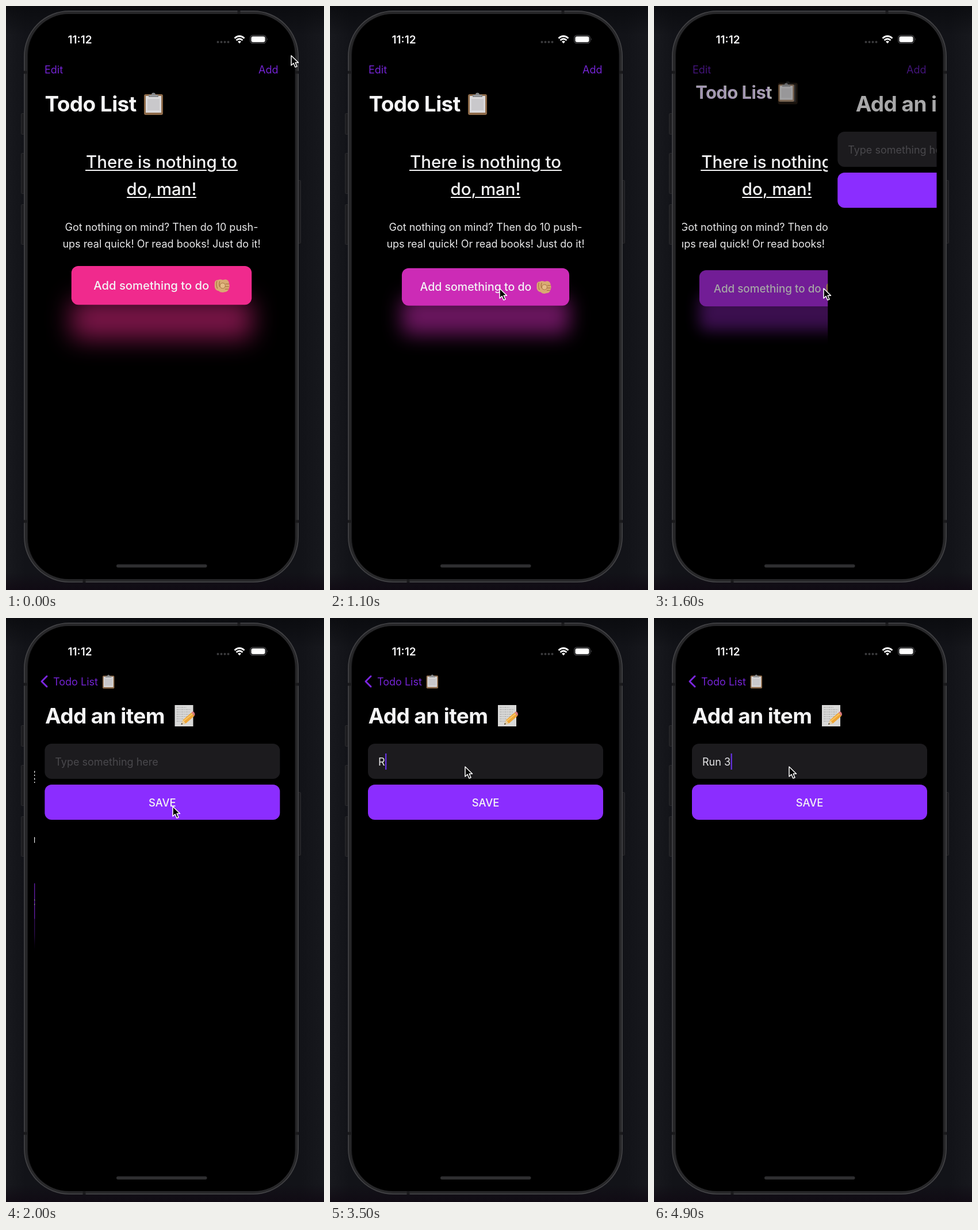
Write an HTML page that moves like this. It is 553 px wide and 1013 px high and loops after 5 s.

```html
<!DOCTYPE html>
<html lang="en">
<head>
<meta charset="utf-8">
<title>Todo list</title>
<style>
  html, body { margin: 0; width: 100%; height: 100%; overflow: hidden; background: #15161b; }
  svg { display: block; width: 553px; height: 1013px; }
  text { font-family: Inter, Roboto, sans-serif; font-size: 18px; fill: #f4f4f5; white-space: pre; }
  .title { font-size: 37px; font-weight: 700; letter-spacing: -.016em; }
  .head { font-size: 29.4px; font-weight: 500; text-anchor: middle; stroke: #000; stroke-width: 4; paint-order: stroke; }
  .body { text-anchor: middle; fill: #e9e9ea; }
  .accent { fill: #7424d4; }
  .label { font-size: 20.3px; font-weight: 500; }
  .save { font-size: 18.4px; font-weight: 500; text-anchor: middle; }
  .time { font-size: 19px; font-weight: 600; }
</style>
</head>
<body>
<svg viewBox="0 0 553 1013">
  <defs>
    <linearGradient id="wall">
      <stop offset="0" stop-color="#18191e"/><stop offset=".06" stop-color="#121318"/>
      <stop offset=".93" stop-color="#121318"/><stop offset="1" stop-color="#17181d"/>
    </linearGradient>
    <linearGradient id="shade" x2="0" y2="1">
      <stop offset="0" stop-color="#08090c" stop-opacity=".7"/><stop offset=".05" stop-color="#08090c" stop-opacity="0"/>
      <stop offset=".97" stop-color="#100913" stop-opacity="0"/><stop offset="1" stop-color="#100913" stop-opacity=".8"/>
    </linearGradient>
    <clipPath id="content"><rect x="49" y="14" width="442.5" height="980"/></clipPath>

    <!-- Icons in a 35 x 39 box -->
    <g id="clipboard">
      <rect x="1" y="3" width="33" height="36" rx="3" fill="#8d6a49"/>
      <rect x="4" y="6" width="27" height="29" fill="#dbdadc"/>
      <rect x="7" y="11" width="21" height="20" fill="#c9c8cb"/>
      <path d="M9 8V4h5a3.5 3.5 0 0 1 7 0h5v4z" fill="#85878a"/>
      <path d="M11 5.5h13" stroke="#a9abad"/>
    </g>
    <g id="memo">
      <rect x="1" y="1" width="32" height="37" fill="#d9d9d8"/>
      <path d="M4 5h17M4 9h25M4 13h24M4 17h26M4 21h23M4 25h13M4 29h10" stroke="#a3a3a4" stroke-width="1.2" stroke-dasharray="4 1 2 1"/>
      <path d="M12 35l3-8 15-13 5 6-15 13z" fill="#eea536"/>
      <path d="M16 29l16-13" stroke="#f9c664" stroke-width="2"/>
      <path d="M30 14l2-2q4 1 4 6l-1 2z" fill="#d9797d"/>
      <path d="M12 35l3-8 5 6z" fill="#e6cfa5"/>
      <path d="M12 35l1-3 2 2z" fill="#333"/>
    </g>
    <g id="hand">
      <path d="M0 7q0-6 6-6 4-2 8 0l5-1q6 1 6 7 2 4 0 8-1 7-8 7-6 2-10-2-6-1-7-7z" fill="#d9aa72"/>
      <path d="M4 3q-2 7 1 13M9 3q-2 6 0 10M19 8h6M18 12.500h7M18 17h6" fill="none" stroke="#a97543" stroke-width="1.3"/>
      <path d="M10 8q3-3 7-1 3 3 1 7-3 3-7 1-3-3-1-7z" fill="#e5bc86" stroke="#a97543"/>
    </g>
  </defs>

  <rect width="553" height="1013" fill="url(#wall)"/>
  <rect width="553" height="1013" fill="url(#shade)"/>

  <!-- Phone body -->
  <g fill="#1d1d20" stroke="#2b2b2e">
    <rect x="26.500" y="186.500" width="6" height="36" rx="1"/>
    <rect x="26.500" y="255.500" width="6" height="70" rx="1"/>
    <rect x="26.500" y="344.500" width="6" height="69" rx="1"/>
    <rect x="506.500" y="302.500" width="6" height="109" rx="1"/>
  </g>
  <rect x="32" y="9" width="476" height="990" rx="78" fill="#1e1e20" stroke="#3f3f42" stroke-width="2"/>
  <rect x="35" y="12" width="470" height="984" rx="75" fill="none" stroke="#2a2a2c" stroke-width="2"/>
  <path d="M31 115h6M503 115h6M31 894h6M503 894h6M405 8v6M136 994v6" stroke="#1a1a1c" stroke-width="5"/>
  <rect x="38" y="14" width="464.500" height="980" rx="71"/>

  <!-- Scrolling pages -->
  <g clip-path="url(#content)">
    <g id="list">
      <path d="M138 285H403M210 332H331" stroke="#f4f4f5" stroke-width="2"/>
      <text class="head" x="270.500" y="281">There is nothing to</text>
      <text class="head" x="270.500" y="328">do, man!</text>
      <text class="body" x="270.500" y="390">Got nothing on mind? Then do 10 push-</text>
      <text class="body" x="270.500" y="419">ups real quick! Or read books! Just do it!</text>
      <g id="button">
        <rect id="glow" rx="12" opacity=".52"/>
        <rect id="face" rx="12"/>
        <g id="label">
          <text class="label" x="-118.500" y="7">Add something to do</text>
          <use href="#hand" x="92.500" y="-11"/>
        </g>
      </g>
    </g>
    <g id="form">
      <rect x="49" y="200" width="443" height="760"/>
      <rect x="66" y="218" width="409" height="61" rx="12" fill="#1c1b1e"/>
      <text id="entry" x="84" y="256"></text>
      <rect id="caret" y="235" width="2.200" height="28" fill="#6732e6"/>
      <rect x="66" y="289" width="409" height="61" rx="12" fill="#8b2dff"/>
      <text class="save" x="270.500" y="326.500">SAVE</text>
    </g>
    <g id="formTitle">
      <text class="title" x="66.500" y="183">Add an item</text>
      <use href="#memo" x="291" y="150"/>
    </g>
  </g>

  <!-- Navigation bar -->
  <g id="listTitle">
    <text class="title" x="-.5" y="13">Todo List</text>
    <use href="#clipboard" x="171" y="-20"/>
  </g>
  <g id="backTitle">
    <text class="accent" y="6.500">Todo List</text>
    <use href="#clipboard" transform="translate(85 -12) scale(.62)"/>
  </g>
  <path id="chevron" d="M71 101l-9 9 9 9" fill="none" stroke="#7b26e0" stroke-width="3" stroke-linecap="round" stroke-linejoin="round"/>
  <g id="actions">
    <text class="accent" x="67" y="117">Edit</text>
    <text class="accent" x="473.500" y="117" text-anchor="end">Add</text>
  </g>

  <!-- Status bar and home bar -->
  <text class="time" x="107.500" y="64.500">11:12</text>
  <path d="M368.500 62.500h20" stroke="#3b3b3d" stroke-width="4" stroke-linecap="round" stroke-dasharray="0 6"/>
  <g fill="none" stroke="#fff" stroke-width="2.800">
    <path d="M397.500 56q8.500-7.500 17 0M400.500 59.500q5.500-5 11 0"/>
    <path d="M406 65l-3-3.200q3-2.500 6 0z" fill="#fff" stroke="none"/>
  </g>
  <rect x="424.700" y="51" width="27.500" height="13.500" rx="4.500" fill="none" stroke="#4c4c4f" stroke-width="1.300"/>
  <rect x="426.500" y="52.800" width="24" height="10" rx="3" fill="#fff"/>
  <path d="M454 55.500q2 2.200 0 4.500z" fill="#4c4c4f"/>
  <rect x="192" y="968.500" width="157.500" height="5.500" rx="2.750" fill="#2e2e30"/>

  <path id="cursor" d="M0 0V17l4-3.700 2.900 6.700 3.100-1.300-2.900-6.500H12.500z" fill="#000" stroke="#fff" stroke-width="1.500" stroke-linejoin="round"/>
</svg>

<script>
const LOOP = 5000, STEP = 100, CENTER = 270.5, PAGE_WIDTH = 442;
const PINK = [243, 42, 138], PURPLE = [139, 45, 255];
const PULSE_PEAK = 200, PULSE_TIME = 2150;

const POINTER = [
  [0, 496, 86], [600, 289, 488], [700, 289, 491], [900, 295, 490],
  [1700, 295, 490], [2000, 290, 327], [2500, 235, 258], [LOOP, 235, 258]
];
const TYPING = [[3400, "R"], [3700, "Ru"], [4000, "Run"], [4400, "Run "], [4800, "Run 3"]];
const CARET_START = 2700;

const ui = Object.fromEntries([...document.querySelectorAll("svg > g[id], svg > path[id], svg > g [id]")].map(el => [el.id, el]));

const clamp = x => Math.min(1, Math.max(0, x));
const mix = (a, b, k) => a + (b - a) * k;
const smooth = x => x * x * (3 - 2 * x);
const set = (el, attrs) => { for (const key in attrs) el.setAttribute(key, attrs[key]); };
const move = (el, x, y = 0, scale = 1) => set(el, { transform: `translate(${x} ${y}) scale(${scale})` });

// Share of the push transition still to go: a critically damped spring.
function pushLeft(t) {
  const x = Math.max(0, t - 1511) * 0.01635;
  return (1 + x) * Math.exp(-x);
}

function pointerAt(t) {
  const i = Math.max(1, POINTER.findIndex(p => p[0] > t));
  const [a, b] = [POINTER[i - 1], POINTER[i]];
  const k = smooth((t - a[0]) / (b[0] - a[0]));
  return [mix(a[1], b[1], k), mix(a[2], b[2], k)];
}

function drawButton(t) {
  const q = smooth(clamp(Math.abs(t - PULSE_PEAK) / PULSE_TIME));
  const half = mix(157.5, 126, q), top = mix(450.8, 461, q), height = mix(67.4, 61, q);
  const fill = `rgb(${PINK.map((c, i) => Math.round(mix(c, PURPLE[i], q)))})`;
  const box = { x: CENTER - half, width: 2 * half, height, fill };
  set(ui.face, { ...box, y: top });
  set(ui.glow, { ...box, y: top + mix(59, 35, q) });
  ui.glow.style.filter = `blur(${mix(22, 9, q)}px)`;
  move(ui.label, CENTER, mix(485, 492, q), mix(1, 0.9, q));
  set(ui.button, { opacity: mix(1, 0.68, clamp((t - 1350) / 200)) });
}

function drawPush(t) {
  const left = pushLeft(t), p = 1 - left, k = p ** 1.3;
  const titleX = mix(68, 82, k), titleY = mix(170, 110, k);
  move(ui.list, -133 * p);
  move(ui.form, PAGE_WIDTH * left);
  move(ui.formTitle, 496 * left);
  move(ui.listTitle, titleX, titleY, mix(1, 0.5, k));
  move(ui.backTitle, titleX, titleY, mix(2, 1, k));
  set(ui.list, { visibility: left < 0.001 ? "hidden" : "visible" });
  set(ui.formTitle, { opacity: clamp(0.35 + 0.8 * p) });
  set(ui.listTitle, { opacity: clamp(1 - 0.7 * p - Math.max(0, p - 0.6)) });
  set(ui.backTitle, { opacity: p ** 2 });
  set(ui.chevron, { opacity: clamp((p - 0.45) / 0.55) });
  set(ui.actions, { opacity: left });
}

function drawEntry(t) {
  const typed = TYPING.filter(([start]) => start <= t).pop()?.[1] ?? "";
  ui.entry.textContent = typed || "Type something here";
  ui.entry.style.fill = typed ? "#e6e6e8" : "#49484c";
  const end = typed ? ui.entry.getComputedTextLength() : 0;
  set(ui.caret, { x: 84.5 + end, visibility: t >= CARET_START ? "visible" : "hidden" });
}

function draw(t) {
  drawButton(t);
  drawPush(t);
  drawEntry(t);
  move(ui.cursor, ...pointerAt(t));
}

const start = performance.now();
function tick() {
  const t = (performance.now() - start) % LOOP;
  draw(Math.floor(t / STEP) * STEP);
  requestAnimationFrame(tick);
}
tick();
</script>
</body>
</html>
```
